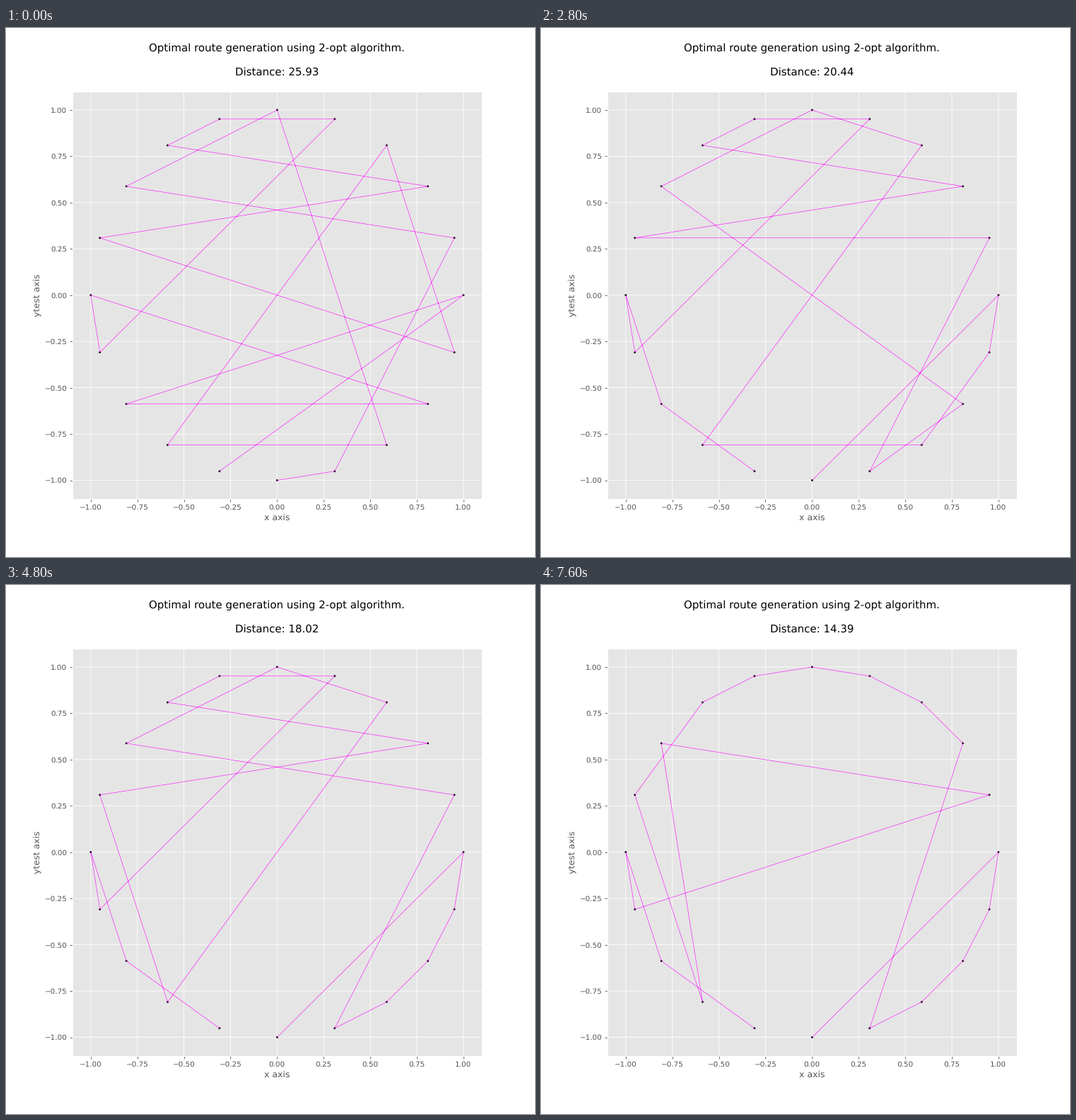
These frames come from a looping animation (748x748 px, 8000 ms). A matplotlib script:

```python
from itertools import islice

import numpy as np
import matplotlib.pyplot as plt
from matplotlib.animation import FuncAnimation

plt.style.use("ggplot")
plt.rcParams.update({"font.family": "DejaVu Sans", "text.hinting": "none"})

FRAMES, INTERVAL = 20, 400
TOLERANCE = 1e-9

# Cities are numbered counter-clockwise around the unit circle.
angles = np.arange(20) * np.pi / 10
cities = np.column_stack([np.cos(angles), np.sin(angles)])
start = [14, 0, 12, 18, 10, 11, 4, 6, 7, 2, 9, 19, 3, 13, 17, 5, 8, 1, 16, 15]


def length(route):
    return np.hypot(*np.diff(cities[route], axis=0).T).sum()


def two_opt(route):
    """Yield the route after every reversal that does not lengthen it."""
    yield route
    for end in range(len(route) - 2, 0, -1):
        for begin in range(end - 1, 0, -1):
            flipped = route[begin:end + 1][::-1]
            candidate = route[:begin] + flipped + route[end + 1:]
            if length(candidate) <= length(route) + TOLERANCE:
                route = candidate
                yield route


routes = list(islice(two_opt(start), FRAMES))

fig, ax = plt.subplots(figsize=(10, 10), dpi=74.8)
ax.scatter(*cities.T, s=5, color=["black"] * len(cities))
line, = ax.plot(*cities[start].T, color="magenta", linewidth=0.55)
ax.set_xlabel("x axis")
ax.set_ylabel("ytest axis")
plt.setp(ax.get_xgridlines() + ax.get_ygridlines(), snap=False)
title = ax.set_title("")


def update(frame):
    route = routes[frame]
    line.set_data(*cities[route].T)
    title.set_text("Optimal route generation using 2-opt algorithm.\n\n"
                   f"Distance: {length(route):.2f}\n")
    return line, title


anim = FuncAnimation(fig, update, frames=FRAMES, interval=INTERVAL,
                     init_func=lambda: (line, title), repeat=True,
                     repeat_delay=0)
plt.show()
```
